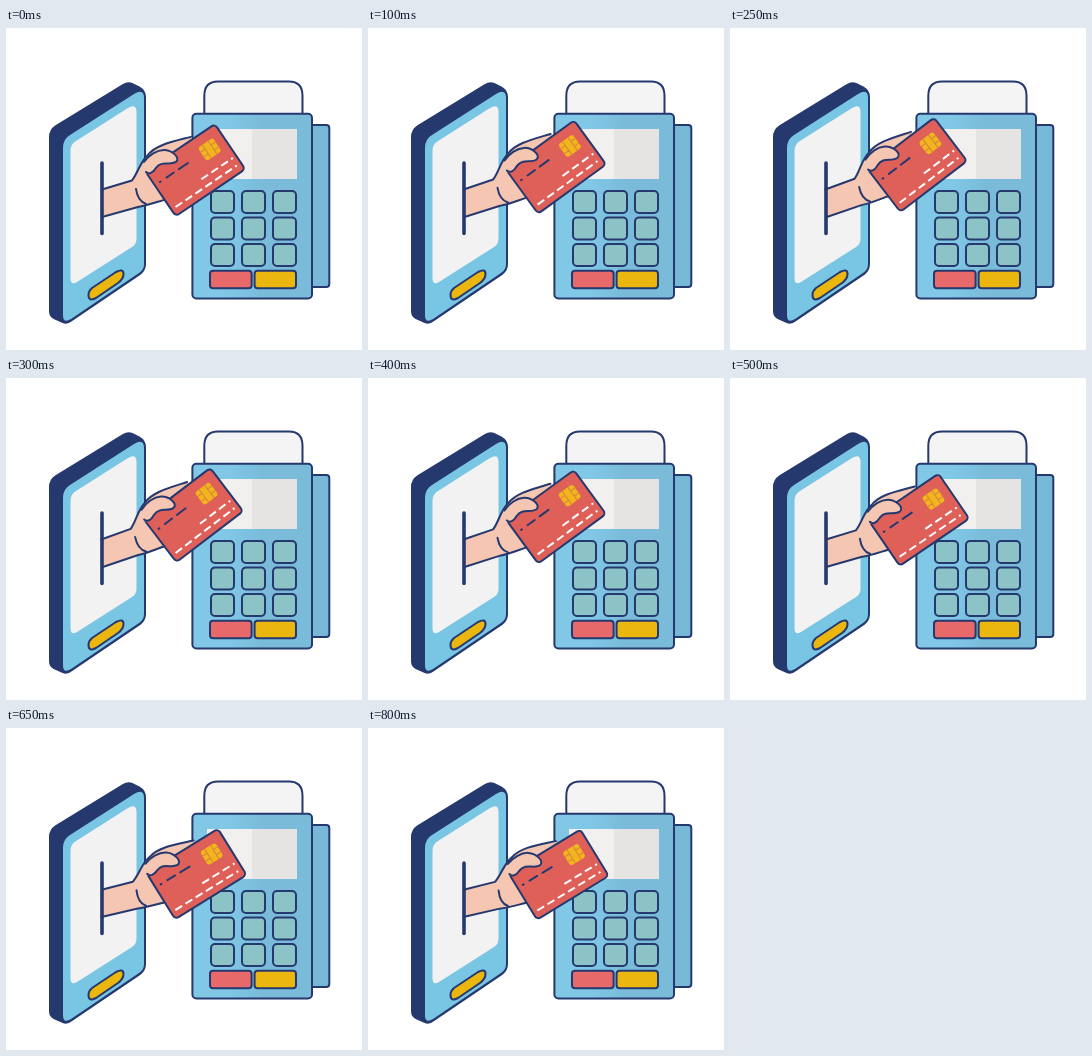
An HTML page for the animation above (850 ms loop, 356 px wide and 322 px high).

```html
<!DOCTYPE html>
<html lang="en">
<head>
<meta charset="utf-8">
<title>Card payment</title>
<style>
  html, body { margin: 0; width: 100%; height: 100%; overflow: hidden; background: #fff; }
  svg { display: block; width: 100vw; height: 100vh; }
  .line { stroke: #26396f; stroke-width: 2; stroke-linecap: round; stroke-linejoin: round; }
  .skin { fill: #f5c6b2; }
  .none { fill: none; }
</style>
</head>
<body>
<svg viewBox="0 0 356 322">
  <defs>
    <linearGradient id="body">
      <stop offset=".3" stop-color="#80c8e6"/>
      <stop offset=".6" stop-color="#79bbd9"/>
    </linearGradient>
  </defs>

  <!-- terminal -->
  <rect class="line" x="290" y="97" width="33.3" height="162" rx="3" fill="#76b8d6"/>
  <path class="line" d="M198.3 90V68Q198.3 53.6 212 53.6H283Q296.5 53.6 296.5 68V90Z" fill="#f4f4f4"/>
  <rect class="line" x="186.4" y="85.8" width="119.6" height="184.6" rx="4" fill="url(#body)"/>
  <path d="M201 101H291V151H201Z" fill="#f1f0ef"/>
  <path d="M246 101H291V151H246Z" fill="#e5e4e3"/>
  <g id="keys" class="line"></g>
  <rect class="line" x="204" y="242.7" width="41.6" height="17.6" rx="3" fill="#e8696a"/>
  <rect class="line" x="248.6" y="242.7" width="41.4" height="17.6" rx="3" fill="#ebb60d"/>

  <!-- phone -->
  <path class="line" d="M44 109Q44 102 50 98L117 57Q122 54 126 56L134 60Q139 63 139 69V236Q139 242 134 246L66 292Q61 296 57 294L48 290Q44 288 44 283Z" fill="#26396f"/>
  <path d="M57 120Q57 111 64 107L128 66Q138 60 138 70V236Q138 242 133 245L65 291Q57 296 57 287Z" fill="#79c5e4"/>
  <path d="M64.5 123Q64.5 116 70 113L122 80Q130.5 75 130.5 84V211Q130.5 216 126 219L71 254Q64.5 258 64.5 250Z" fill="#f3f2f2"/>
  <path class="line" d="M86 260L110 244Q117.5 240 117.5 246Q117.5 251 112 255L90 270Q82.5 274 82.5 267Q82.5 263 86 260Z" fill="#ebb60d"/>

  <!-- arm, hand and card -->
  <g id="arm">
    <path class="skin" d="M96 161.5L126 152.5C132 145 134 134 142 127C150 117 166 114 185 109L192 120L160 173C150 174 142 177 134 179L96 189Z"/>
    <path class="line none" d="M96 161.5L126 152.5C132 145 134 134 142 127C150 117 166 114 185 109M96 189L132 179C140 178 148 175 158 172M130 161C131 168 134 174 140 176"/>
    <g transform="translate(189.3 142.3) rotate(-34)">
      <rect class="line" x="-42" y="-27.2" width="84" height="54.4" rx="4" fill="#de6059"/>
      <path class="line none" d="M-36-10H-35M-28-10H-19M-13-10H-2"/>
      <path class="none" d="M0 11H38M-37 19.5H37" stroke="#fff" stroke-width="2" stroke-dasharray="8 4"/>
      <rect x="14.5" y="-17" width="18" height="16" rx="3" fill="#f2b51d"/>
      <path class="none" d="M14-12H20V-6H14M33-12H27V-6H33M20-12V-17M27-12V-17M20-6V-1M27-6V-1" stroke="#d9813f"/>
    </g>
    <path class="skin" d="M137 139C141 130 150 122 158 122C166 122 175 130 170 134C164 138 156 132 150 140C147 146 142 147 138 145Z"/>
    <path class="line none" d="M138 134C143 127 151 122 158 122C166 122 175 130 170 134C164 138 156 132 150 140C147 145 143 147 140 144"/>
  </g>
  <path class="line none" d="M96 135V205.5" style="stroke-width:3.6"/>
</svg>
<script>
  const LOOP = 850, STEP = 50, SWING = 980, PEAK = 255;
  const arm = document.getElementById('arm');

  let keys = '';
  for (const y of [163, 189.5, 216]) {
    for (const x of [205, 236, 267]) {
      keys += `<rect x="${x}" y="${y}" width="23" height="22" rx="4" fill="#8bc3c6"/>`;
    }
  }
  document.getElementById('keys').innerHTML = keys;

  // The arm swings about the slot; the loop restarts before the swing ends.
  function draw(now) {
    const t = Math.floor(now % LOOP / STEP) * STEP;
    const angle = -0.3 - 3.1 * Math.cos(2 * Math.PI * (t - PEAK) / SWING);
    arm.setAttribute('transform', `rotate(${angle} 96 175)`);
    requestAnimationFrame(draw);
  }
  draw(0);
</script>
</body>
</html>
```
